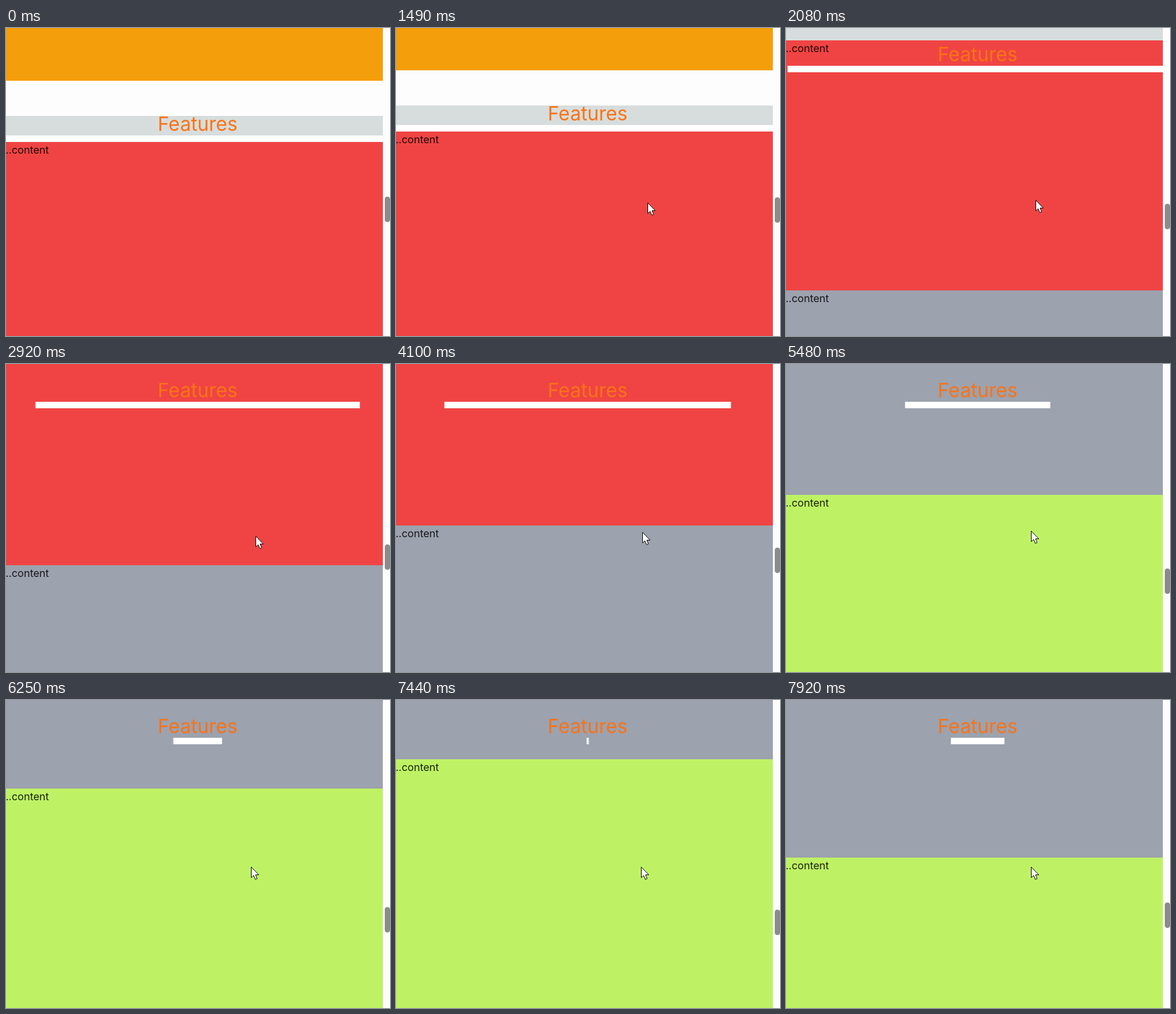
Write an HTML page with a canvas that moves like this. It is 591 px wide and 473 px high and loops after 7.99 s.

```html
<!DOCTYPE html>
<html lang="en">
<head>
<meta charset="utf-8">
<style>
  html, body { margin: 0; height: 100%; overflow: hidden; background: #fdfdfd; }
  canvas { display: block; }
</style>
</head>
<body>
<canvas id="stage" width="591" height="473"></canvas>
<script>
const ctx = document.getElementById('stage').getContext('2d');
const LOOP = 7990, STEP = 69.6, PHASE = 1928 % STEP;
const PAGE_W = 580, LINE_W = 590, CENTER = LINE_W / 2;
const SECTION_H = 384, STICKY_Y = 28, TITLE_H = 30, LINE_H = 10;
const SECTIONS = ['#f04444', '#9ca2ae', '#bef264'];

// Wheel flicks: start ms, duration ms, new top of the first section, ease-out power
const FLICKS = [
  [1371, 348, 97, 1],
  [1858, 1148, -75, 3],
  [3320, 350, -136, 3],
  [4475, 557, -319, 3],
  [5060, 1023, -632, 3],
  [6244, 557, -759, 3],
  [7275, 430, -526, 1],
];

// Pointer progress along one straight path; 0 is its first resting place, 1 its last
const POINTER_MOVES = [[328, 487, 0, 2], [1450, 500, .3, 2], [3320, 350, .8, 2], [4475, 557, 1, 2]];
const POINTER_IN = -14.7;

const arrow = new Path2D('M0 0V16.3L3.7 13L6.2 19L9 17.8L6.5 12H11.5Z');
const clamp01 = x => Math.min(1, Math.max(0, x));

function follow(moves, value, t) {
  for (const [start, duration, to, power] of moves) {
    const x = clamp01((t - start) / duration);
    value += (to - value) * (1 - (1 - x) ** power);
  }
  return value;
}

const sectionTop = t => follow(FLICKS, 175, t);

// The line shrinks as two sections pass under it, through an overdamped spring
function lineWidth(t) {
  const dt = .005, stiffness = 80, damping = 30;
  let scale = 1, speed = 0;
  for (let ms = 0; ms < t; ms += dt * 1000) {
    const passed = STICKY_Y + TITLE_H + LINE_H - sectionTop(ms);
    const goal = 1 - clamp01(passed / (2 * SECTION_H));
    speed += (stiffness * (goal - scale) - damping * speed) * dt;
    scale += speed * dt;
  }
  return LINE_W * scale;
}

function rect(color, x, y, w, h) {
  ctx.fillStyle = color;
  ctx.fillRect(x, y, w, h);
}

function text(str, x, y, size, color, align) {
  ctx.font = `${size}px Inter, sans-serif`;
  ctx.textAlign = align;
  ctx.fillStyle = color;
  ctx.fillText(str, x, y);
}

function drawPointer(progress) {
  ctx.save();
  ctx.translate(Math.round(388 - 10 * progress) - .5, Math.round(268 - 12 * progress) + .5);
  ctx.fillStyle = '#fff';
  ctx.strokeStyle = '#111';
  ctx.fill(arrow);
  ctx.stroke(arrow);
  ctx.restore();
}

function draw(now) {
  const t = Math.floor((now % LOOP - PHASE) / STEP) * STEP + PHASE;
  const top = Math.round(sectionTop(t));

  rect('#fdfdfd', 0, 0, 591, 473);
  rect('#f59e0b', 0, 0, PAGE_W, Math.max(0, top - 94));
  rect('#d7dddc', 0, top - TITLE_H - LINE_H, PAGE_W, TITLE_H + LINE_H);
  SECTIONS.forEach((color, i) => {
    const y = top + i * SECTION_H;
    rect(color, 0, y, PAGE_W, SECTION_H);
    text('...content', 66, y + 18, 16, 'rgba(0,0,0,.87)', 'right');
  });

  // Sticky heading
  const head = Math.max(STICKY_Y, top - TITLE_H - LINE_H);
  const width = lineWidth(t), left = CENTER - width / 2;
  text('Features', CENTER, head + 23, 30, '#f97316', 'center');
  rect('#fff', left, head + TITLE_H, Math.min(PAGE_W - left, width), LINE_H);

  // Scrollbar
  ctx.fillStyle = '#8b8b8b';
  ctx.beginPath();
  ctx.roundRect(583, Math.round(259 + (175 - top) * .0735), 8, 39, 4);
  ctx.fill();

  const progress = follow(POINTER_MOVES, POINTER_IN, t);
  if (progress > POINTER_IN) drawPointer(progress);
}

const start = performance.now();
function loop() {
  draw(performance.now() - start);
  requestAnimationFrame(loop);
}
loop();
</script>
</body>
</html>
```
